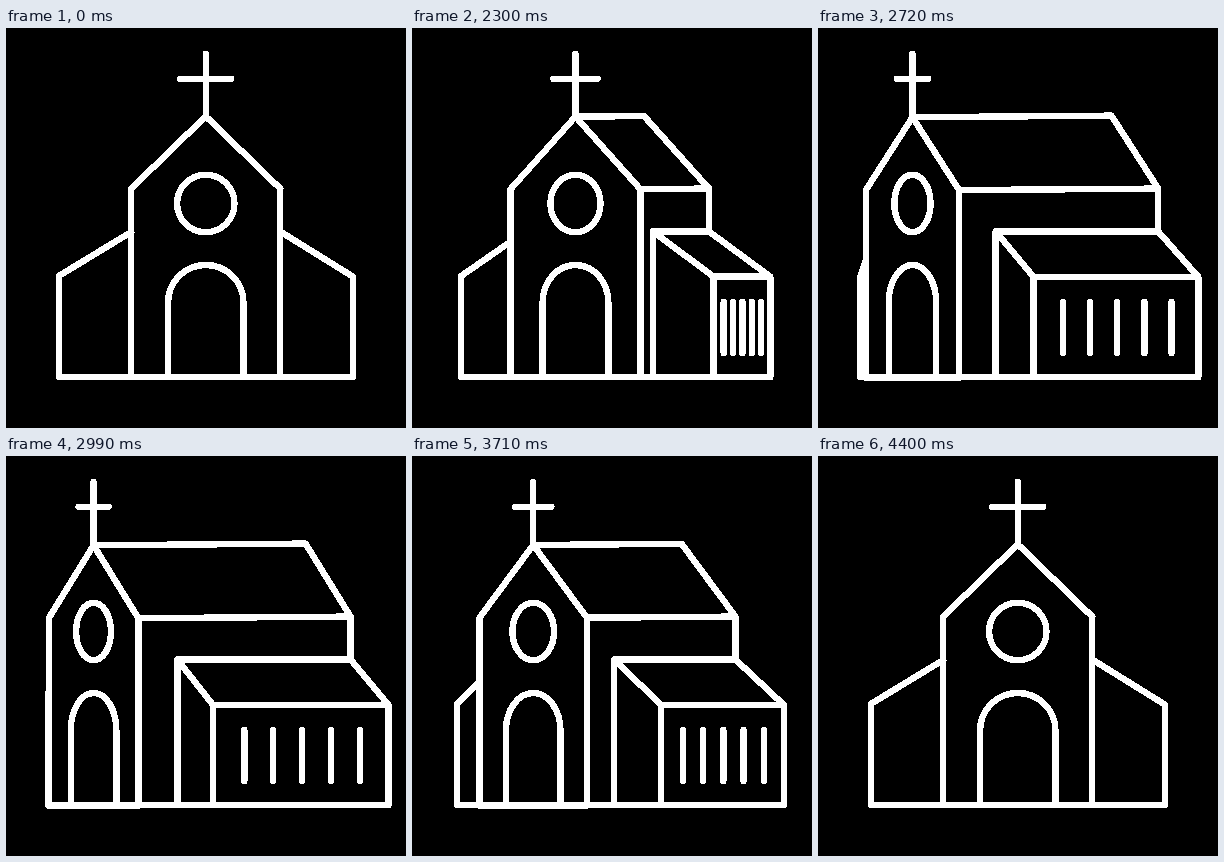
These frames come from a looping animation (400 by 400 pixels, 4430 ms). An HTML page:

```html
<!DOCTYPE html>
<html lang="en">
<head>
<meta charset="utf-8">
<title>Church</title>
<style>
  html, body { margin: 0; width: 100%; height: 100%; overflow: hidden; background: #000; }
  svg { display: block; width: 100%; height: 100%; }
  path {
    fill: none; stroke: #fff; stroke-width: 6.4; stroke-linecap: round; stroke-linejoin: round;
    shape-rendering: crispEdges;
  }
</style>
</head>
<body>
<svg viewBox="0 0 400 400"><path id="church" transform="translate(-0.25 0)"/></svg>
<script>
const LOOP = 4430, STEP = 30, TURN = 2000, BACK = 3215, END = 4400;
const church = document.getElementById('church');

const bezier = (x1, y1, x2, y2) => x => {
  const at = (a, b, s) => 3 * a * s * (1 - s) ** 2 + 3 * b * s * s * (1 - s) + s ** 3;
  let lo = 0, hi = 1;
  for (let i = 0; i < 30; i++) {
    const mid = (lo + hi) / 2;
    if (at(x1, x2, mid) < x) lo = mid; else hi = mid;
  }
  return at(y1, y2, lo);
};
const easeOut = bezier(0.4, 0, 0.26, 1);
const easeBack = bezier(0.62, 0, 0.38, 1);

// 0 = front view, 1 = fully turned
function turnAt(t) {
  if (t < TURN + STEP) return 0;
  const q = TURN + Math.floor((t - TURN) / STEP) * STEP;
  if (q >= END) return 0;
  if (q < BACK) return easeOut(Math.min(1, (q - TURN) / 1000));
  return 1 - easeBack((q - BACK) / (END - BACK));
}

function outline(p) {
  const mix = (a, b) => a + (b - a) * p;
  const line = (...pts) => 'M' + pts.map(([x, y]) => x.toFixed(2) + ' ' + y.toFixed(2)).join('L');

  const mid = mix(200, 87.8);
  const left = mix(125.5, 43), right = mix(274.5, 132.6);
  const outer = mix(53, 42), far = mix(347, 382.8);
  const back = mix(274.5, 344.8);
  const near = mix(274.5, 171.6), corner = mix(347, 207.3);
  const peak = mix(88.3, 89.3), ridge = mix(88.3, 87.6);
  const eave = mix(160.6, 162.2), backEave = 160.6;
  const wingTop = 203.5, ledge = mix(248.5, 249);
  const base = 349, front = mix(349, 349.8);

  const arm = mix(25.5, 15), rose = mix(28.7, 17.4), door = mix(37.7, 22.8);
  const parts = [
    line([mid, 26], [mid, peak]),
    line([mid - arm, 50.8], [mid + arm, 50.8]),
    // facade
    line([left, front], [left, eave], [mid, peak], [right, eave], [right, front], [left, front]),
    `M${mid - rose} 175.5a${rose} 28.7 0 1 1 ${2 * rose} 0a${rose} 28.7 0 1 1 ${-2 * rose} 0`,
    `M${mid - door} ${base}V274.5a${door} 37.5 0 0 1 ${2 * door} 0V${base}`,
    // left wing and ground
    line([left, mix(204, 234)], [outer, 248], [outer, base], [far, base]),
    // main roof and side wall
    line([mid, peak], [mix(200, 299.8), ridge], [back, backEave], [right, eave]),
    line([back, backEave], [back, wingTop]),
    // side wing
    line([near, base], [near, wingTop], [back, wingTop], [far, ledge], [far, base]),
    line([near, wingTop], [corner, ledge], [far, ledge]),
    line([corner, ledge], [corner, base])
  ];
  for (let i = 0; i < 5; i++) {
    const x = mix(347, 238.6 + 28.9 * i);
    parts.push(line([x, 274], [x, 325]));
  }
  return parts.join('');
}

const start = performance.now();
function draw() {
  const t = (performance.now() - start) % LOOP;
  church.setAttribute('d', outline(turnAt(t)));
  requestAnimationFrame(draw);
}
draw();
</script>
</body>
</html>
```
